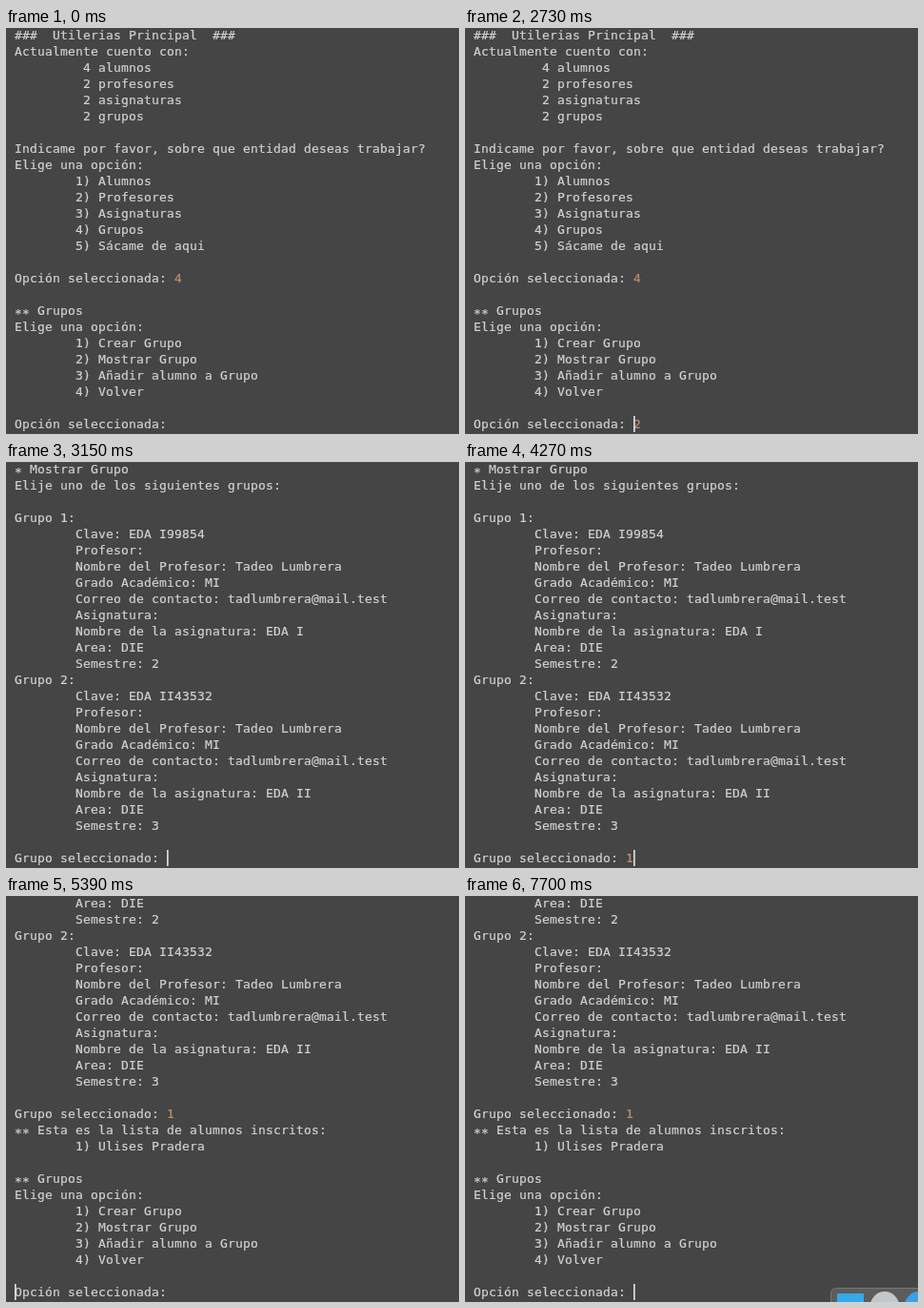
Animation, 476 px wide and 426 px high, one loop 7770 ms. Source, as an HTML page with a canvas:

```html
<!DOCTYPE html>
<html lang="es">
<head>
<meta charset="utf-8">
<title>Consola</title>
<style>
  html, body { margin: 0; width: 100%; height: 100%; overflow: hidden; background: #454545; }
  canvas { display: block; }
</style>
</head>
<body>
<canvas id="stage" width="476" height="426"></canvas>
<script>
const ctx = document.getElementById('stage').getContext('2d');
const LOOP = 7770;
const LEFT = 9, COL = 8, ROW = 17, BASE = 12;
const BACK = '#454545', INK = '#d2d2d2', INPUT = '#bd8f72', CARET = '#dcdcdc';
const TAB = ' '.repeat(8);

const indent = lines => lines.map(line => TAB + line);
const numbered = items => indent(items.map((item, i) => `${i + 1}) ${item}`));

const group = (n, key, subject, term) => [
  `Grupo ${n}:`,
  ...indent([
    `Clave: EDA ${key}`,
    'Profesor:',
    'Nombre del Profesor: Tadeo Lumbrera',
    'Grado Académico: MI',
    'Correo de contacto: tadlumbrera@mail.test',
    'Asignatura:',
    `Nombre de la asignatura: EDA ${subject}`,
    'Area: DIE',
    `Semestre: ${term}`
  ])
];

const groupMenu = [
  '** Grupos',
  'Elige una opción:',
  ...numbered(['Crear Grupo', 'Mostrar Grupo', 'Añadir alumno a Grupo', 'Volver']),
  '',
  'Opción seleccionada: '
];

const groups = [...group(1, 'I99854', 'I', 2), ...group(2, 'II43532', 'II', 3)];

// "~" marks the next character as typed input.
const menuScreen = [
  '###  Utilerias Principal  ###',
  'Actualmente cuento con:',
  ...indent([' 4 alumnos', ' 2 profesores', ' 2 asignaturas', ' 2 grupos']),
  '',
  'Indicame por favor, sobre que entidad deseas trabajar?',
  'Elige una opción:',
  ...numbered(['Alumnos', 'Profesores', 'Asignaturas', 'Grupos', 'Sácame de aqui']),
  '',
  'Opción seleccionada: ~4',
  '',
  ...groupMenu
];

const groupScreen = [
  '* Mostrar Grupo',
  'Elije uno de los siguientes grupos:',
  '',
  ...groups,
  '',
  'Grupo seleccionado: '
];

const resultScreen = [
  ...groups.slice(8),
  '',
  'Grupo seleccionado: ~1',
  '** Esta es la lista de alumnos inscritos:',
  ...numbered(['Ulises Pradera']),
  '',
  ...groupMenu
];

// Each step: start time, screen, typed text, caret column (-1 hides it).
const steps = [
  [0, menuScreen, '', -1],
  [770, menuScreen, '', 21],
  [1260, menuScreen, '', -1],
  [1820, menuScreen, '', 21],
  [2100, menuScreen, '~2', 22],
  [2520, menuScreen, '~2', 21],
  [2800, groupScreen, '', 0],
  [3080, groupScreen, '', 20],
  [3570, groupScreen, '', -1],
  [4130, groupScreen, '', 20],
  [4270, groupScreen, '~1', 21],
  [4760, groupScreen, '~1', -1],
  [5040, groupScreen, '~1', 20],
  [5390, resultScreen, '', 0],
  [5670, resultScreen, '', 21],
  [6160, resultScreen, '', -1],
  [6650, resultScreen, '', 21],
  [7210, resultScreen, '', -1],
  [7630, resultScreen, '', 21]
];

// A hairline stroke gives the glyphs a slightly heavier weight.
function drawLine(text, row) {
  let col = 0;
  ctx.fillStyle = ctx.strokeStyle = INK;
  for (const ch of text) {
    if (ch === '~') {
      ctx.fillStyle = ctx.strokeStyle = INPUT;
      continue;
    }
    const x = LEFT + col * COL;
    const y = BASE + row * ROW + (ch === '*' ? 3 : 0);
    ctx.fillText(ch, x, y);
    ctx.strokeText(ch, x, y);
    col++;
  }
}

function disc(x, y, r, color) {
  ctx.fillStyle = color;
  ctx.beginPath();
  ctx.arc(x, y, r, 0, Math.PI * 2);
  ctx.fill();
}

function drawDock(drop) {
  ctx.save();
  ctx.translate(0, drop);
  ctx.beginPath();
  ctx.roundRect(384.5, 411.5, 120, 40, 5);
  ctx.fillStyle = '#5c5c5c';
  ctx.fill();
  ctx.strokeStyle = '#777';
  ctx.lineWidth = 1;
  ctx.stroke();
  ctx.fillStyle = '#35a9ea';
  ctx.fillRect(391, 417, 28, 28);
  disc(441, 430, 15, '#c3c7ca');
  disc(477, 430, 15, '#3d9fe6');
  ctx.restore();
}

function draw(t) {
  const [, screen, typed, caret] = steps.findLast(step => step[0] <= t);
  ctx.fillStyle = BACK;
  ctx.fillRect(0, 0, 476, 426);
  ctx.font = '13px "DejaVu Sans Mono", monospace';
  ctx.textBaseline = 'alphabetic';
  ctx.lineWidth = 0.2;
  const last = screen.length - 1;
  screen.forEach((line, row) => drawLine(row === last ? line + typed : line, row));
  if (caret >= 0) {
    ctx.fillStyle = CARET;
    ctx.fillRect(LEFT + caret * COL, last * ROW - 1, 1.7, ROW);
  }
  if (t >= 7630) drawDock(t < 7700 ? 8 : 0);
}

const start = performance.now();
function tick() {
  draw((performance.now() - start) % LOOP);
  requestAnimationFrame(tick);
}
tick();
</script>
</body>
</html>
```
